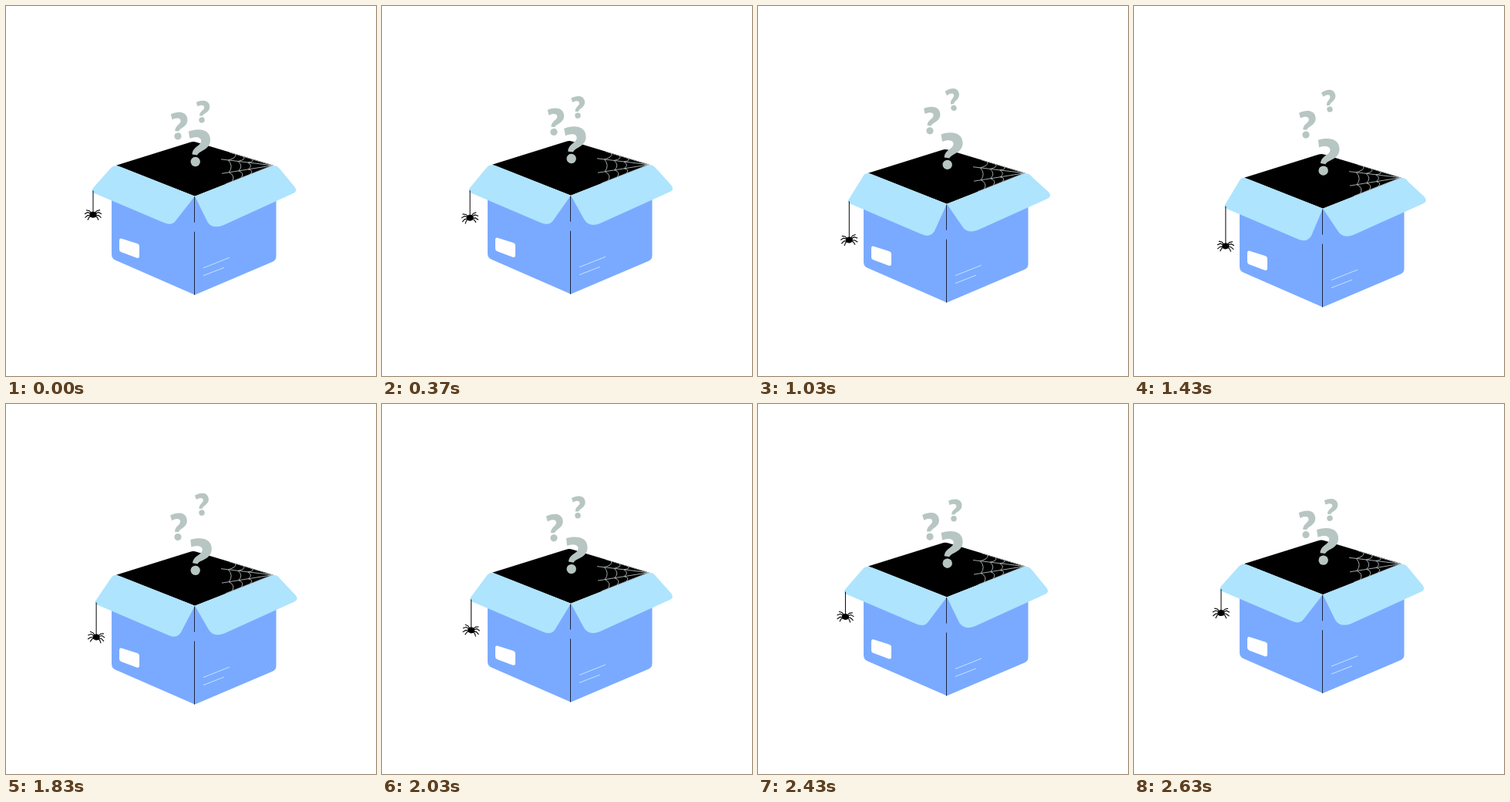
Write an HTML page that moves like this. It is 480 px wide and 480 px high and loops after 2.67 s.

```html
<!DOCTYPE html>
<html lang="en">
<head>
<meta charset="utf-8">
<title>Empty box</title>
<style>
html, body { margin: 0; width: 100%; height: 100%; overflow: hidden; background: #fff; }
svg { display: block; width: 100vw; height: 100vh; }
</style>
</head>
<body>
<svg viewBox="0 0 480 480">
  <defs>
    <clipPath id="hole"><path d="M143 207L239 177Q243 175.500 247 177L347 207L245 247Z"/></clipPath>
    <g id="ask">
      <path d="M-8 -39.500C5 -44 20 -42 20 -28C20 -18 11 -15 6 -12Q3.500 -10.500 2.500 -8.500L-4 -9.500C-3 -20 8 -20 8 -27C8 -32 1 -33 -6.500 -30Z"/>
      <circle r="6.200"/>
    </g>
  </defs>
  <g id="box">
    <path d="M143 207L239 177Q243 175.500 247 177L347 207L245 247Z"/>
    <path id="web" clip-path="url(#hole)" fill="none" stroke="#b4bcbc" stroke-width=".9"/>
    <path d="M137 235V322Q137 328 142 330L245 375L346 332Q350.500 330 350.500 325V235L245 247Z" fill="#7aaaff"/>
    <path d="M244.500 247V281M244.500 293V375" stroke="#1c2740"/>
    <path d="M150 302L170.500 308.500Q173 309.300 173 312V324.500Q173 328 169.500 327L149.500 319.500Q147 318.500 147 316V304.500Q147 301 150 302Z" fill="#fff"/>
    <path d="M256 340L290 326.500M256 350L283 339.500" stroke="#c9e2fd"/>
    <g fill="#aee4fd"><path id="left"/><path id="right"/></g>
  </g>
  <path id="thread" stroke="#000"/>
  <g id="spider">
    <ellipse rx="4.600" ry="4"/>
    <path id="legs" fill="none" stroke="#000" stroke-width="1.100"/>
  </g>
  <g id="asks" fill="#b7c6c2"></g>
</svg>
<script>
const LOOP = 2670;
const el = id => document.getElementById(id);
const set = (node, name, value) => node.setAttribute(name, value);

// x, mid y, travel, time of highest point, size, mid tilt, tilt swing
const marks = [
  [245.7, 207, 9, 415, 1, 0, -2.3],
  [223, 167.3, 6.6, 775, .74, -6, 2.5],
  [254, 140.4, 8.4, 1130, .6, -11, -6]
].map(([x, y, amp, peak, size, tilt, swing]) => {
  const node = document.createElementNS('http://www.w3.org/2000/svg', 'use');
  set(node, 'href', '#ask');
  el('asks').append(node);
  return { node, x, y, amp, peak, size, tilt, swing };
});

function webPath() {
  const hub = [346, 207];
  const ends = [[290, 190], [279, 199], [280, 217.5], [285, 231]];
  const at = (end, f) => hub.map((h, i) => h + (end[i] - h) * f);
  let d = ends.map(e => `M${hub}L${e}`).join('');
  for (const f of [.86, .67, .48]) {
    d += 'M' + at(ends[0], f);
    for (let i = 1; i < ends.length; i++) {
      const mid = [0, 1].map(k => (ends[i - 1][k] + ends[i][k]) / 2);
      d += `Q${at(mid, f - .1)} ${at(ends[i], f)}`;
    }
  }
  return d;
}

function legPath() {
  const side = s => [[-2, 5, -5, 9, -6], [-1, 7, -3, 11, -1], [1, 7, 1, 10.500, 4], [2, 5, 3, 7, 7]]
    .map(([y, kx, ky, x, ey]) => `M${2 * s} ${y}L${kx * s} ${ky}L${x * s} ${ey}`).join('');
  return side(1) + side(-1);
}

set(el('web'), 'd', webPath());
set(el('legs'), 'd', legPath());

const wave = (t, peak) => Math.cos(2 * Math.PI * (t - peak) / LOOP);
const fold = (t, start) => (1 - wave(t, start)) / 2;

function draw(t) {
  const drop = 7.3 - 8.900 * wave(t, 245);
  const p = fold(t, -10), q = fold(t, -180);
  set(el('box'), 'transform', `translate(0 ${drop})`);

  const cx = 109.300 + 6 * p, cy = 240.300 + 4.500 * p;
  const kx = 215 + 9 * p, ky = 286 + 6 * p;
  set(el('left'), 'd', `M245 247L149 209Q140 205 ${135 + 2 * p} ${211.500 - p}L${cx + 4} ${cy - 4.500}`
    + `Q${cx} ${cy} ${cx + 5} ${cy + 2.500}L${kx - 11} ${ky - 5}Q${kx} ${ky} ${kx + 5 + p} ${ky - 7 - 2 * p}Z`);

  const rx = 379 + 3 * q, ry = 240.500 - 3 * q;
  const jx = 267 + 4 * q, jy = 290 - 4 * q;
  set(el('right'), 'd', `M245 247L${jx - 6} ${jy - 10}Q${jx} ${jy} ${jx + 14} ${jy - 5}L${rx - 7} ${ry + 3}`
    + `Q${rx} ${ry} ${rx - 5} ${ry - 6}L356 212.500Q351 205 343 208.500Z`);

  const sx = 113 + 6 * p, top = cy + drop - .5, sy = top + 31 + 21 * fold(t, -30);
  set(el('thread'), 'd', `M${sx} ${top}V${sy}`);
  set(el('spider'), 'transform', `translate(${sx} ${sy}) rotate(${-9 * wave(t, LOOP / 4)})`);

  for (const m of marks) {
    const w = wave(t, m.peak);
    set(m.node, 'transform',
      `translate(${m.x} ${m.y - m.amp * w}) rotate(${m.tilt + m.swing * w}) scale(${m.size})`);
  }
}

const begin = performance.now();
function tick() {
  draw((performance.now() - begin) % LOOP);
  requestAnimationFrame(tick);
}
tick();
</script>
</body>
</html>
```
